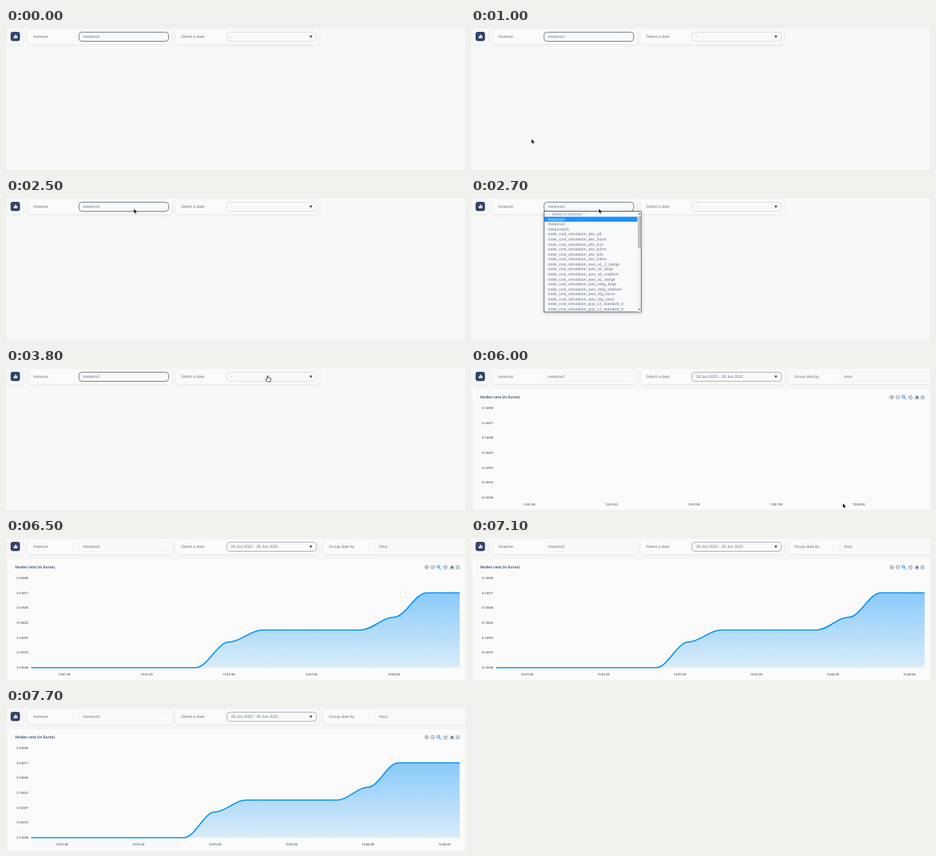
Write an HTML page that moves like this. It is 600 by 187 pixels and loops after 8 s.

```html
<!DOCTYPE html>
<html lang="en">
<head>
<meta charset="utf-8">
<title>Node cost dashboard</title>
<style>
  html, body { margin: 0; width: 100%; height: 100%; overflow: hidden; background: #f8f8f8; }
  svg { display: block; width: 100vw; height: 100vh; }
  text { font: 5.2px "Liberation Sans", Arial, sans-serif; fill: #67748e; text-rendering: geometricPrecision; white-space: pre; }
  .panel { fill: #f9faf9; filter: drop-shadow(0 1.5px 2.5px rgba(0, 0, 0, .07)); }
  .field { fill: #f8f9f9; stroke: #eef0f0; stroke-width: .7; }
  .pop { filter: drop-shadow(0 1px 2px rgba(0, 0, 0, .25)); }
  .mid { text-anchor: middle; }
  .month { font-size: 4.6px; font-weight: bold; text-anchor: middle; }
  .axis { font: 600 4px "Open Sans", sans-serif; fill: #4c555d; }
  .title { font: bold 5px "Open Sans", sans-serif; fill: #4a5a78; }
  .tools { fill: none; stroke: #6e8192; stroke-width: .7; }
</style>
</head>
<body>
<svg id="stage" viewBox="0 0 600 187" preserveAspectRatio="none">
  <defs>
    <linearGradient id="shade" x1="0" y1="0" x2="0" y2="1">
      <stop offset="0" stop-color="#008ffb" stop-opacity=".45"/>
      <stop offset="1" stop-color="#008ffb" stop-opacity=".13"/>
    </linearGradient>
  </defs>

  <rect class="panel" x="2" y="2" width="20" height="19" rx="4"/>
  <rect x="6" y="5" width="12.3" height="12.3" rx="3.2" fill="#324669"/>
  <path d="M10 11h1.4v2.5H10zM11.7 8.8h1.5v4.7h-1.5zM13.5 10.2h1.4v3.3h-1.4z" fill="#fff"/>

  <rect class="panel" x="29" y="2" width="187" height="19" rx="4"/>
  <text x="35.5" y="13">Instance</text>
  <rect id="instBox" class="field" x="95.4" y="5.5" width="117.2" height="12" rx="4"/>
  <text id="inst" x="100.5" y="13.3"></text>

  <rect class="panel" x="222" y="2" width="187" height="19" rx="4"/>
  <text x="229" y="13">Select a date</text>
  <rect id="dateBox" class="field" x="288.7" y="5.5" width="117.2" height="12" rx="4"/>
  <text id="date" x="294" y="13.2"></text>
  <path d="M396.6 9.9h3.8l-1.9 3.3z" fill="#3c4657"/>

  <g id="group">
    <rect class="panel" x="416" y="2" width="190" height="19" rx="4"/>
    <text x="422.3" y="13">Group data by</text>
    <rect class="field" x="482" y="5.5" width="125" height="12" rx="4"/>
    <text x="487.5" y="13.3">Hour</text>
  </g>

  <g id="chart">
    <rect class="panel" x="2" y="28" width="606" height="170" rx="4"/>
    <text class="title" x="12" y="40">Nodes rate (in Euros)</text>
    <g class="tools">
      <circle cx="550" cy="38.5" r="2.3"/><path d="M548.8 38.5h2.4M550 37.3v2.4"/>
      <circle cx="557.9" cy="38.5" r="2.3"/><path d="M556.7 38.5h2.4"/>
      <g stroke="#008ffb" stroke-width="1"><circle cx="565.2" cy="37.8" r="1.7"/><path d="M566.5 39.2l2.2 2.3"/></g>
      <path d="M572.8 39.8l-1-1.4M572.8 39.8v-3M574 38.6v-2.7M575.2 38.6v-2.5M576.4 38.6v-1.8M572.8 39.4l1 1.7h2l.8-2.5"/>
      <path d="M580.2 38.8l2.8-2.7 2.8 2.7h-.9v2.4h-1.3v-1.6h-1.2v1.6h-1.3v-2.4z" fill="#6e8192" stroke="none"/>
      <path d="M587.6 36.8h5.4M587.6 38.6h5.4M587.6 40.4h5.4"/>
    </g>
    <g id="yAxis"></g>
    <g id="xAxis"></g>
    <path id="area" fill="url(#shade)"/>
    <path id="line" fill="none" stroke="#008ffb" stroke-width="1.6"/>
  </g>

  <g id="list">
    <rect class="pop" x="95.5" y="17.6" width="127" height="132.4" fill="#f8f9f9" stroke="#4b5564" stroke-width=".8"/>
    <rect id="mark" x="96" width="121.6" height="6.55" fill="#1e90ff"/>
    <g id="rows"></g>
    <rect x="217.7" y="18" width="4.4" height="131.6" fill="#eeefef"/>
    <rect x="218.1" y="24" width="3.7" height="42" fill="#bfc1c2"/>
    <path d="M218.7 21.8h2.6l-1.3-1.7zM218.7 146h2.6l-1.3 1.7z" fill="#4a4f55"/>
  </g>

  <g id="picker">
    <rect class="pop" x="288.5" y="18" width="233" height="125" rx="1" fill="#fff"/>
    <text x="296" y="35.6" style="font-size:11.05px">Choose Dates</text>
    <path d="M512.4 29.9l5 5M517.4 29.9l-5 5" stroke="#55617a" stroke-width="1"/>
    <path d="M304 50.6h-6M300.4 48l-2.7 2.6 2.7 2.6M453.5 50.6h6M457.1 48l2.7 2.6-2.7 2.6" fill="none" stroke="#3da5f4" stroke-width=".9"/>
    <text class="month" x="338.2" y="52">June 2022</text>
    <text class="month" x="419" y="52">July 2022</text>
    <rect id="dayMark" x="319.9" y="113" width="10.2" height="10.4" fill="#344767"/>
    <g id="days"></g>
    <path d="M468.5 38.5v85" stroke="#d5d9df" stroke-width=".8"/>
    <rect id="todayBox" x="473.4" y="39.4" width="44.4" height="13" fill="none" stroke="#344767" stroke-width=".9"/>
    <g id="presets"></g>
    <rect x="473" y="100.8" width="45" height="17.2" fill="#344767"/>
    <text class="mid" x="495.5" y="111.2" style="fill:#fff">Apply</text>
  </g>

  <path id="arrow" d="M0 0V6.3L1.5 5L2.5 7.1L3.6 6.6L2.7 4.6H4.7Z" fill="#111" stroke="#fff" stroke-width=".4"/>
  <path id="hand" d="M-.7 5V.8Q0-.4.7.8V3.2Q1.4 2.5 1.9 3.3Q2.5 2.7 3 3.5Q3.9 3 4.2 4V5.8L3.4 8.2H-.8L-2.9 5.3Q-2.6 4-1.6 4.7Z" fill="#fff" stroke="#222" stroke-width=".75"/>
</svg>
<script>
const LOOP = 8000, STEP = 100;
const el = id => document.getElementById(id);
const set = (id, name, value) => el(id).setAttribute(name, value);
const show = (id, on) => set(id, 'display', on ? 'inline' : 'none');

function addText(parent, x, y, str, cls = '') {
  const node = document.createElementNS('http://www.w3.org/2000/svg', 'text');
  node.setAttribute('x', x);
  node.setAttribute('y', y);
  node.setAttribute('class', cls);
  node.textContent = str;
  return el(parent).appendChild(node);
}

// Dropdown
const ROW = 6.57, ROW_TOP = 18.1;
const nodes = [
  ...'a8 b1ms b1s b2ms b2s b4ms'.split(' ').map(s => 'aks_' + s),
  ...'a1_2_xlarge a1_large a1_medium a1_xlarge m6g_large m6g_medium t4g_micro t4g_nano'.split(' ').map(s => 'aws_' + s),
  'gcp_c2_standard_4', 'gcp_c2_standard_8'
].map(s => 'node_cost_simulation_' + s);
const rows = ['-- Select a instance --', 'instance1', 'instance2', 'instances05', ...nodes]
  .map((s, i) => addText('rows', 100.5, ROW_TOP + ROW * i + 5, s));

// Calendar
function addMonth(x, firstDay, count) {
  'Sun Mon Tue Wed Thu Fri Sat'.split(' ').forEach((d, i) => addText('days', x + 10.77 * i, 63.8, d, 'mid'));
  const cells = [];
  for (let d = 1; d <= count; d++) {
    const cell = firstDay + d - 1;
    cells.push(addText('days', x + 10.77 * (cell % 7), 78.8 + 10.33 * Math.floor(cell / 7), d, 'mid'));
  }
  return cells;
}
const june = addMonth(303.5, 3, 30);
addMonth(390, 5, 31);
['Today', 'This Month', 'Last Month', 'Last 30 Days']
  .forEach((s, i) => addText('presets', 477, 47.8 + 15.45 * i, s));

// Chart
const LEFT = 33, RIGHT = 593, BASE = 170.7;
const heights = [...Array(6).fill(BASE), 137, 121.3, 121.3, 121.3, 121.3, 104.3, 72.2, 72.2, 72.2];
['0.14696', '0.14671', '0.14646', '0.14622', '0.14597', '0.14573', '0.14548'].forEach((s, i) => {
  addText('yAxis', 29, 53.9 + 19.7 * i, s, 'axis').style.textAnchor = 'end';
});
const ticks = Array.from({ length: 6 }, (_, i) => {
  const s = 40 + 5 * i;
  const clock = `13:0${1 + Math.floor(s / 60)}:${String(s % 60).padStart(2, '0')}`;
  return addText('xAxis', 0, 180.6, clock, 'axis mid');
});

function drawTicks(span) {
  ticks.forEach((tick, i) => {
    const x = LEFT + (RIGHT - LEFT) * (2 + 5 * i) / span;
    tick.setAttribute('x', x);
    tick.setAttribute('display', x < RIGHT ? 'inline' : 'none');
  });
}

// p blends from 13 intervals to 14 as a new reading arrives
function drawCurve(p) {
  const width = RIGHT - LEFT;
  const xAt = i => LEFT + width * (Math.min(i / 13, 1) * (1 - p) + i / 14 * p);
  let d = `M${LEFT} ${BASE}`;
  for (let i = 1; i < heights.length; i++) {
    const x0 = xAt(i - 1), x = xAt(i), bend = (x - x0) * .35;
    d += `C${x0 + bend} ${heights[i - 1]} ${x - bend} ${heights[i]} ${x} ${heights[i]}`;
  }
  set('line', 'd', d);
  set('area', 'd', `${d}V${BASE}H${LEFT}Z`);
}

// Pointer keys: time, x, y
const path = [
  [400, 58, 145], [500, 62, 148], [600, 62, 148], [800, 71, 143], [1000, 79, 146], [2000, 79, 146],
  [2500, 167, 14], [2700, 167, 14], [2900, 150, 27], [3000, 140, 32], [3200, 125, 33], [3300, 125, 33],
  [3600, 315, 10], [3700, 315, 10], [3800, 342, 9.8], [4000, 342, 9.8], [4100, 347, 11], [4200, 347, 11],
  [4400, 446, 51], [4500, 446, 51], [4800, 486, 43], [5000, 486, 43], [5400, 488.3, 111], [5600, 488.3, 111],
  [6000, 486, 178]
];

function pointerAt(t) {
  const i = path.findIndex(k => k[0] >= t);
  const b = path[i], a = path[Math.max(i - 1, 0)];
  const p = b === a ? 0 : (t - a[0]) / (b[0] - a[0]);
  return [a[1] + (b[1] - a[1]) * p, a[2] + (b[2] - a[2]) * p];
}

const within = (t, from, to) => t >= from && t < to;

function drawPointer(t) {
  const visible = within(t, 400, 6100);
  const hand = within(t, 3600, 4300) || within(t, 4800, 5500);
  show('arrow', visible && !hand);
  show('hand', visible && hand);
  if (visible) set(hand ? 'hand' : 'arrow', 'transform', `translate(${pointerAt(t)})`);
}

function draw(t) {
  const picked = t >= 5000;
  el('inst').textContent = t < 3400 ? 'instance1' : 'instance2';
  el('date').textContent = picked ? '28 Jun 2022 - 28 Jun 2022' : '-';
  el('instBox').style.stroke = t < 3900 ? '#3f4b60' : '';
  el('dateBox').style.stroke = t < 3900 ? '#cfd4d6' : '#8b94a3';

  const active = t < 3000 ? 1 : 2;
  show('list', within(t, 2600, 3400));
  set('mark', 'y', ROW_TOP + ROW * active);
  rows.forEach((row, i) => {
    row.style.fill = i === active ? '#fff' : i ? '' : '#858c99';
  });

  show('picker', within(t, 4000, 5500));
  set('picker', 'opacity', t < 4100 ? .6 : 1);
  show('dayMark', picked);
  show('todayBox', picked);
  june[27].style.fill = picked ? '#fff' : '';

  show('group', t >= 5500);
  show('chart', t >= 5800);
  show('line', t >= 6500);
  show('area', t >= 6500);
  drawTicks(t < 6700 ? 26 : 28);
  const p = Math.min(Math.max((t - 6650) / 1050, 0), 1);
  drawCurve((1 - Math.cos(Math.PI * p)) / 2);

  drawPointer(t);
}

const start = performance.now();
function tick() {
  const t = (performance.now() - start) % LOOP;
  draw(Math.floor(t / STEP) * STEP);
  requestAnimationFrame(tick);
}
tick();
</script>
</body>
</html>
```
